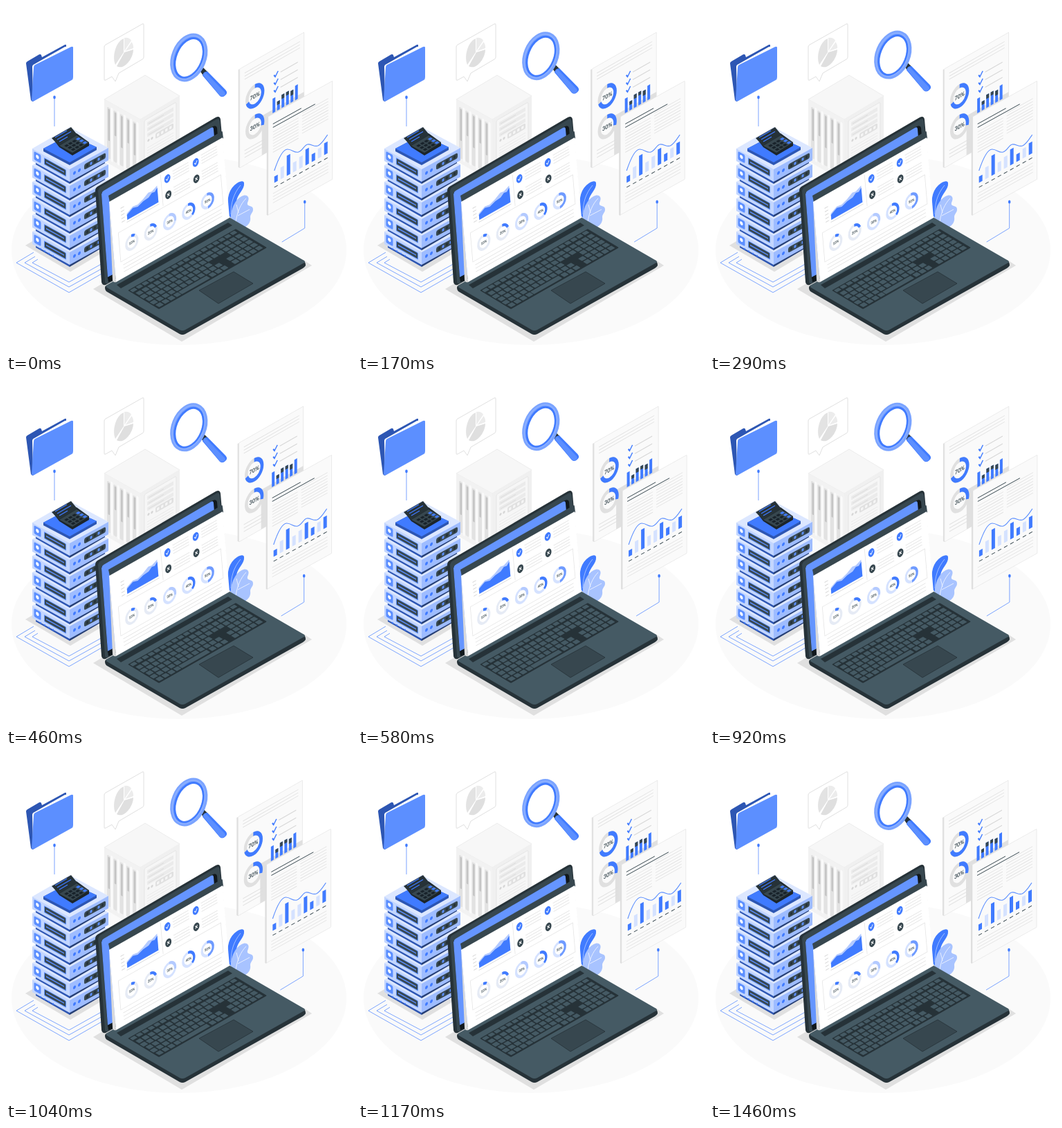
An HTML page that plays this animation: 500 px wide and 500 px high, repeating every 1500 ms.

```html
<!DOCTYPE html>
<html lang="en">
<head>
<meta charset="utf-8">
<title>Data report</title>
<style>
html,body{margin:0;width:100%;height:100%;overflow:hidden;background:#fff}
svg{display:block;width:100vw;height:100vh}
text{font-family:Lato,"Open Sans",sans-serif;font-weight:700;fill:#37474f;text-anchor:middle}
</style>
</head>
<body>
<svg viewBox="0 0 500 500" xmlns="http://www.w3.org/2000/svg">
<ellipse cx="250" cy="353" rx="242" ry="137" fill="#fafafa"/>

<!-- folder -->
<g>
<path d="M29 83q0-2 2-3l17-10q2-1 3 1l1 3 33-18q2-1 2 1v49L39 138q-2 0-3-2z" fill="#2d56b3"/>
<path d="M38 88q0-3 3-4l44-25q3-1 3 1v45l-49 28z" fill="#fff"/>
<path d="M40 89q0-3 2-4l52-26q3-1 3 1v43q0 3-2 4l-54 30q-4 2-4-1z" fill="#5c8fff"/>
<path d="M70 132v42" stroke="#7aa3ff"/>
<ellipse cx="70" cy="132" rx="1.8" ry="2.4" fill="#407bff"/>
</g>

<!-- speech bubble -->
<g>
<path d="M142 59q0-2 2-3l53-30q2-1 2 1v47q0 2-2 3l-34 20-5 12-5-7-9 5q-2 1-2-1z" fill="#fff" stroke="#e0e0e0"/>
<path d="M170 47v20l-12 18c-5-11 0-33 12-38z" fill="#e3e3e3"/>
<path d="M171 67l13-4c0 10-8 22-16 25q-5 1-8-1z" fill="#dfdfdf"/>
<path d="M171 65v-19q7-1 10 4zM172.500 65l9-13q3 4 2.500 9z" fill="#ececec"/>
</g>

<!-- grey server -->
<g>
<path d="M142 135l59-35 50 30-57 34z" fill="#f7f7f7" stroke="#e9e9e9" stroke-width=".8"/>
<path d="M142 135l52 29v90l-52-30z" fill="#f2f2f2"/>
<path d="M194 164l57-34v90l-57 34z" fill="#f0f0f0"/>
<g id="fins" transform="matrix(1 .56 0 1 142 135)"></g>
<g id="bay" transform="matrix(1 -.58 0 1 194 164)"></g>
</g>

<!-- blue server -->
<path d="M28 346l20-12 92 22-47 28z" fill="#e0e0e0"/>
<g fill="none" stroke="#6f9bff" stroke-width=".9">
<path d="M40 356l-25 15 76 43 54-31M42 362l-15 9 64 35 52-29M46 366l-8 5 53 28 50-28"/>
</g>
<g id="stack"></g>
<g>
<path d="M54 206l38-20 39 18v4l-39 22-38-20z" fill="#2d56b3"/>
<path d="M54 206l38-20 39 18-39 22z" fill="#407bff"/>
<path d="M67 191l10 13 19 12 24-14v-5l-18-13z" fill="#1c252a"/>
<path d="M77 202l25-15 18 10-24 15z" fill="#37474f"/>
<path d="M66 191l28-16 9 11-26 16z" fill="#263238"/>
<path d="M71 190l17-10M74 193l20-11.500M77 196l12-7" stroke="#407bff" stroke-width="1.300"/>
<g id="pad" transform="matrix(1 -.58 1 .57 80 202)"></g>
</g>

<!-- plant -->
<g>
<path d="M321 302c-2-18-1-34 9-43 6-6 14-8 14-3 1 9-9 15-11 26l-5 27z" fill="#407bff"/>
<path d="M325 301c0-17 4-30 14-42" fill="none" stroke="#fff" stroke-width=".5"/>
<path d="M325 308c-1-10 3-21 9-28 6-6 13-9 16-4 2 4-2 8-1 11 2 3 8 1 8 7 0 5-4 6-4 11 1 6-2 12-9 15z" fill="#a8c3ff"/>
<path d="M332 312c2-14 7-26 15-34M336 299l-3-12M335 303l17-9" fill="none" stroke="#fff" stroke-width=".7"/>
</g>

<!-- reports -->
<g id="docs">
<path d="M336 92l2-1v143l-2-1z" fill="#dedede"/>
<g id="back" transform="matrix(1 -.57 0 1 338 91)"></g>
<g id="front" transform="matrix(1 -.555 0 1 379 160)"></g>
<path d="M377 161l2-1v143l-2-1z" fill="#dedede"/>
<path d="M388 238c6-18 12-31 19-31s10 6 16 4 8-10 13-11 10 4 15 2 10-10 14-16" fill="none" stroke="#5c8fff" stroke-width="1.100"/>
<path d="M432 283v38l-33 20" fill="none" stroke="#7aa3ff"/>
<ellipse cx="432" cy="283" rx="1.800" ry="2.500" fill="#407bff"/>
</g>

<!-- magnifier -->
<g id="handle">
<path d="M279 93l5-4 8 8-6 6z" fill="#263238"/>
<path d="M284 101.500q1-6 7-6l26.500 27q3.500 4-.5 7.500-4 4-8 1z" fill="#407bff"/>
<path d="M284.500 100.500q1-3 3.500-4l28 29q2 3-1 5-3 2-6 0z" fill="#5c8fff"/>
</g>
<g id="lens">
<g transform="translate(264.300 75) rotate(22)" fill="none">
<ellipse rx="21.500" ry="32.500" stroke="#7ba4ff" stroke-width="7.500"/>
<ellipse cx=".6" cy=".6" rx="19" ry="30" stroke="#407bff" stroke-width="3"/>
<ellipse cx="-.5" rx="21.600" ry="32.600" stroke="#8fb2ff" stroke-width="1.500"/>
</g>
</g>

<!-- laptop -->
<path d="M126 409l20-12 284-30 12 8-188 110z" fill="#e0e0e0"/>
<path d="M143 407q0-3 4-4l173-94 110 59q3 2 3 7-1 2-4 4l-170 95q-4 2-8 0l-105-61q-3-2-3-6z" fill="#263238"/>
<path d="M146 403l176-98 109 63q2 2 0 3l-172 97q-4 2-8 0l-105-61q-3-2 0-4z" fill="#455a64"/>
<path d="M160 403l161-90 6 4-161 91z" fill="#263238"/>
<g id="keys" transform="matrix(1 -.57 1 .6 176 411)"></g>
<path d="M279 411l50-27 28 17-50 29z" fill="#37474f" stroke="#263238" stroke-width=".8"/>
<path d="M129 266q0-3 3-5l171-100q6-3 7 3l12 139-178 100q-5 1-6-4z" fill="#263238"/>
<path d="M133 267q0-3 3-5l168-98q4-2 5 2l12 138-174 97q-4 1-4-3z" fill="#37474f"/>
<path d="M138 270l161-96q5-2 6 2l10 126-168 92z" fill="#11181c"/>
<path d="M138 272q0-3 3-5l155-91q4-2 4 2l10 124-163 90z" fill="#6595ff"/>
<path d="M148 274l164-93q1 0 1 2l1 8-164 93z" fill="#37474f"/>
<path d="M147 392l8-4 1 8-8 3z" fill="#11181c"/>
<path d="M149 283l10 116q-4 1-5-3z" fill="#dadada"/>
<g id="page" transform="matrix(1 -.567 .086 1 149 283)"></g>
</svg>
<script>
const BLUE = '#407bff', PALE = '#d5e2ff', INK = '#37474f', GREY = '#dedede';
const $ = id => document.getElementById(id);
const put = (id, html) => { $(id).innerHTML = html; };
const list = (n, fn) => Array.from({length: n}, (_, i) => fn(i)).join('');
const rect = (x, y, w, h, fill, rx = 0, more = '') =>
  `<rect x="${x}" y="${y}" width="${w}" height="${h}" rx="${rx}" fill="${fill}" ${more}/>`;
const line = (x1, x2, y, color = GREY, w = .8, more = '') =>
  `<path d="M${x1} ${y}H${x2}" stroke="${color}" stroke-width="${w}" ${more}/>`;
const dot = (x, y, rx, ry, fill) => `<ellipse cx="${x}" cy="${y}" rx="${rx}" ry="${ry}" fill="${fill}"/>`;
const poly = (pts, fill) => `<polygon points="${pts}" fill="${fill}"/>`;

function donut(x, y, sx, sy, pct, size, base, color = BLUE) {
  const ring = (stroke, more = '') =>
    `<circle r="8" fill="none" stroke="${stroke}" stroke-width="3.200" pathLength="100" ${more}/>`;
  return `<g transform="translate(${x} ${y})"><g transform="scale(${sx} ${sy}) rotate(-90)">` +
    ring(base) + ring(color, `stroke-dasharray="${pct} 100"`) +
    `</g><text transform="scale(.866 1)" y="${size * .36}" font-size="${size}">${pct}%</text></g>`;
}

// grey server
put('fins', list(5, i => rect(4 + i * 9.3, 8, 5, 74, '#e2e2e2', 2) +
  rect(5.5 + i * 9.3, 10, 2.5, i % 2 ? 34 : 46, '#c4c4c4', 1) + rect(9.5 + i * 9.3, 6, 3, 78, '#fafafa', 1.5)));
put('bay', rect(6, 5, 46, 80, '#f6f6f6', 2, 'stroke="#e3e3e3" stroke-width=".7"') +
  list(3, i => rect(10, 10 + i * 8, 38, 5.5, '#ebebeb', 1) + line(12, 34, 13 + i * 8, '#d8d8d8')) +
  dot(12, 37, 1.6, 1.8, '#d6d6d6') + dot(17, 37, 1.6, 1.8, '#d6d6d6') +
  rect(22, 33, 26, 8, '#e0e0e0', 2) + list(4, i => rect(24 + i * 6, 35, 3.5, 4, '#f5f5f5', 1)) +
  list(6, i => line(10, 48, 47 + i * 4, '#e6e6e6')));

// blue server
const unit = y => `<g transform="translate(0 ${y})">` +
  poly('43,222 92,249 92,257 43,229', '#2d56b3') + poly('92,249 143,219 143,227 92,257', '#263f75') +
  poly('38,206 92,175 148,205 92,236', '#dce7ff') +
  poly('38,206 92,236 92,254 38,224', '#c3d6ff') + poly('92,236 148,205 148,223 92,254', '#9ebcff') +
  '<g transform="matrix(1 .555 0 1 38 206)">' +
  rect(2.5, 2.5, 10, 12, '#5c8fff', 2) + dot(7.4, 8, 2.2, 2.6, '#fff') +
  rect(17, 3.5, 32, 10, '#5c8fff', 1) + rect(18, 4.5, 30, 8, INK, 1) +
  line(20, 46, 8.5, '#5c8fff', 1.6) + '</g>' +
  '<g transform="matrix(1 -.55 0 1 92 236)">' +
  dot(7, 9, 2, 2.4, BLUE) + dot(14, 9, 2, 2.4, BLUE) +
  rect(21, 4.5, 31, 8, INK, 2.5) + list(5, i => rect(24 + i * 5.5, 6.5, 3, 4, i % 2 ? '#5c8fff' : '#263238', .7)) +
  '</g></g>';
put('stack', list(6, i => unit((5 - i) * 24)) +
  list(4, i => dot(50 + i * 6, 351 + i * 3.3, 1, 1.2, BLUE)));
put('pad', list(12, i => rect(2 + i % 4 * 5.6, 2 + (i >> 2) * 4.8, 4, 3.2, i % 4 == 3 ? BLUE : '#18222a', .5)));

// rear report
const caps = [0, 5, 6, 5, 7, 0], stack = [21, 13, 19, 19, 17, 21];
put('back', rect(0, 0, 93, 143, '#fafafa', 1, 'stroke="#e6e6e6" stroke-width=".8"') +
  list(3, i => line(7, 87, 10 + i * 4.5)) +
  rect(32, 86, 61, 57, '#e0e0e0') +
  donut(22, 51.5, 1.42, 1.76, 70, 8.3, '#e0e0e0') + donut(22, 95.5, 1.42, 1.76, 30, 8.3, '#e0e0e0') +
  list(3, i => `<path d="M49.500 ${37 + i * 11}l2 3.500 4-6" fill="none" stroke="${BLUE}" stroke-width="1.700"/>` +
    line(59, 84, 38 + i * 11, '#d6d6d6', 1.1)) +
  stack.map((h, i) => rect(47.500 + i * 6.5, 91 - h, 4, h, BLUE) +
    rect(47.500 + i * 6.5, 91 - h, 4, caps[i], INK)).join('') +
  list(3, i => line(7, 36, 122 + i * 5)));

// front report
const bars = [9, 17, 29, 14, 17, 23, 11, 14, 17];
put('front', rect(0, 0, 93, 142, '#fafafa', 1, 'stroke="#e6e6e6" stroke-width=".8"') +
  line(7, 48, 14.5, INK, 1) + line(7, 68, 19.5, INK, 1) +
  list(8, i => line(7, 44, 26 + i * 4.2) + line(49, 87, 26 + i * 4.2 - 4)) +
  bars.map((h, i) => rect(9 + i * 9, 100.5 - h, 5, h, [0, 2, 5, 6, 8].includes(i) ? BLUE : PALE)).join('') +
  line(9, 87, 107, INK, 1.2, 'stroke-dasharray="5 4"') +
  list(4, i => line(7, 87, 115 + i * 4.5)));

// screen page
const mark = (x, y, ok) => dot(x, y, 4.4, 5.8, ok ? BLUE : INK) +
  `<path d="${ok ? `M${x - 2} ${y}l1.500 2.200 2.700-4.200` : `M${x - 1.6} ${y - 2}l3.200 4m0-4l-3.200 4`}" fill="none" stroke="#fff"/>`;
const arcs = [BLUE, BLUE, '#b3caff', BLUE, '#6f9bff'];
put('page', rect(0, 0, 164, 116, '#fff') +
  `<path d="M74 3V48M9 50H157V92H9z" fill="none" stroke="#e6e6e6" stroke-width=".8"/>` +
  list(5, i => line(15, 20, 18 + i * 5, '#d0d0d0')) +
  line(22, 69, 42, '#d0d0d0') +
  poly('23,39 23,30 32,25 39,26 47,23 55,18 60,19 68,15 68,39', '#b3caff') +
  poly('23,39 23,32 32,27 39,29 47,26 55,25 60,21 64,22 68,18 68,39', BLUE) +
  [[83, 13.5], [124, 13.5], [82.500, 36.5], [123, 36.5]].map(([x, y], i) =>
    mark(x, y, i < 2) + list(4, k => line(x + 8, x + 31, y - 6 + k * 4))).join('') +
  list(5, i => donut(26.5 + i * 27.3, 73.500 + i * .5, 1, 1.16, 10 + i * 10, 5, i > 1 ? PALE : '#e6ebf5', arcs[i])) +
  list(3, i => line(12, 154, 98 + i * 5)));

// keyboard with a bare patch around the arrows
const rows = 6, cols = 18, kw = 8.5, kh = 7.2;
const bare = (r, c) => (c == 12 && r > 2) || (r == 3 && c > 10 && c < 14) || (r == 5 && c > 3 && c < 9);
put('keys', rect(0, 0, 156, 45, '#263238', 1) +
  list(rows * cols, n => {
    const r = Math.floor(n / cols), c = n % cols;
    return bare(r, c) ? '' : rect(1.5 + c * kw + (c < 12 ? r % 2 : 0), 1.2 + r * kh, 6.8, r ? 5.7 : 4.6, '#455a64', .8);
  }) + rect(1.5 + 4 * kw, 1.2 + 5 * kh, 5 * kw - 1.7, 5.7, '#455a64', .8));

// motion: lens floats, handle floats twice as far, reports shake; 24 steps a second
const shake = [0, -1, 2, -4, 4, -4, 4, -4, 2, -1, 0];
const move = (id, x, y) => $(id).setAttribute('transform', `translate(${x.toFixed(3)} ${y.toFixed(3)})`);
function draw(ms) {
  const p = (Math.floor(ms % 1500 * .024 + .05) + 1) % 36 / 36;
  const k = Math.floor(p * 10), f = p * 10 - k;
  const rise = -10 * (1 - Math.abs(1 - 2 * p));
  move('docs', shake[k] + (shake[k + 1] - shake[k]) * f, 0);
  move('lens', 0, rise);
  move('handle', 0, rise * 1.95);
}
const start = performance.now();
function tick() {
  draw(performance.now() - start);
  requestAnimationFrame(tick);
}
tick();
</script>
</body>
</html>
```
